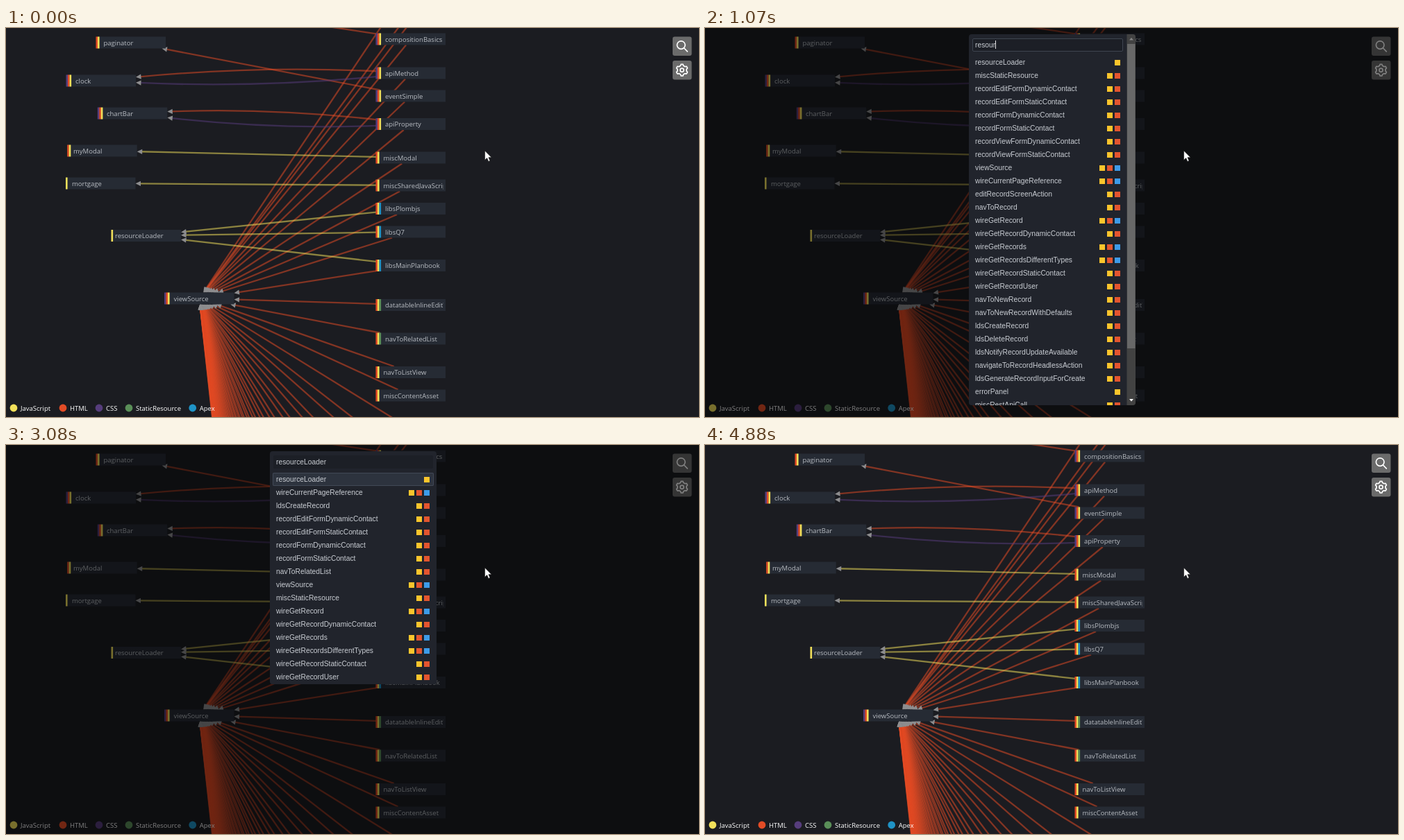
Animation of 998x561 px, one loop 5.14 s. Source, as an HTML page:

```html
<!DOCTYPE html>
<html lang="en">
<head>
<meta charset="utf-8">
<title>Component graph search</title>
<style>
html, body { margin: 0; width: 100%; height: 100%; overflow: hidden; background: #1b1c21; }
#stage { position: relative; width: 998px; height: 561px; overflow: hidden; background: #1b1c21; }
#stage > * { position: absolute; }
svg { display: block; }
#graph, #cursor, #shade { left: 0; top: 0; width: 998px; height: 561px; }
#graph text { font: 9.5px "Open Sans", sans-serif; }
.edge { opacity: .52; }
.edge path { fill: none; stroke-width: 2.3; }
.tip { fill: #8d8d8f; }
.node rect.box { fill: #262b34; }
.node text { fill: #b9bdc3; }
.focus .edge { opacity: .25; }
.focus .tip { fill: #4c4d51; }
.focus .edge.hot { opacity: 1; }
.focus .tip.hot { fill: #fff; }
.focus .node:not(.hot) .box { opacity: .8; }
.focus .node:not(.hot) .mark, .focus .node:not(.hot) text { opacity: .3; }
.focus .pick .box { stroke: #fff; stroke-width: 1.7; }
#shade { background: rgba(0, 0, 0, .5); }
#panel { left: 380px; top: 9px; width: 240px; overflow: hidden; border-radius: 4px; background: #21242c;
  font: 10.3px "Liberation Sans", Arial, sans-serif; color: #c9cdd3; }
#query { position: absolute; left: 5px; top: 6px; right: 5px; height: 19px; box-sizing: border-box;
  border: 1px solid #3e4550; border-radius: 2px; background: #1c1f26; padding-left: 3px; line-height: 18px; white-space: pre; }
#caret { display: inline-block; width: 1px; height: 12px; vertical-align: -2px; background: #e8e8e8; }
#rows { position: absolute; left: 4px; right: 4px; top: 31px; }
.row { display: flex; align-items: center; gap: 3.2px; height: 19px; padding: 0 6px 0 5px; box-sizing: border-box; white-space: nowrap; }
.row span { flex: 1; }
.row i, #side i { width: 8px; height: 8px; flex: none; }
.scroll #query { right: 18px; }
.scroll #rows { right: 16px; }
#bars { position: absolute; left: 0; top: 0; }
#side { left: 0; top: 0; width: 239px; height: 561px; background: #1b1f27; color: #d0d3d8;
  font: 10.3px/19px "Liberation Sans", Arial, sans-serif; }
#side > * { position: absolute; }
#side .bar { left: 0; width: 239px; height: 19px; padding-left: 13px; box-sizing: border-box; background: #252a33;
  font: 8.45px/19px "Open Sans", sans-serif; }
#side .title { top: 19px; height: 23px; padding-left: 4px; background: #2f3640; color: #f2f3f4; font: 600 11px/23px "Open Sans", sans-serif; }
#side .file { left: 23px; }
</style>
</head>
<body>
<div id="stage">
  <svg id="graph" viewBox="0 0 998 561"></svg>
  <div id="shade"></div>
  <div id="panel">
    <div id="query"><span id="typed"></span><span id="caret"></span></div>
    <div id="rows"></div>
    <svg id="bars" width="240" height="535"></svg>
  </div>
  <div id="side"></div>
  <svg id="cursor" viewBox="0 0 998 561">
    <path d="M689.6 177v13.4l3.1-2.8 2.1 4.9 2.3-1-2.1-4.8h4.2z" fill="#fff" stroke="#111" stroke-width=".6"/>
  </svg>
</div>
<script>
const $ = id => document.getElementById(id);
const LOOP = 5140;
const color = { j: '#f1e05a', h: '#e34c26', c: '#563d7c', s: '#5a8f58', a: '#1f93c6' };
const iconColor = { j: '#fcc52c', h: '#e4552f', c: '#3d9be9' };

// ---- graph ----
const W = 50, H = 8.5;
const node = (x, y, marks, label, tx) => ({ x, y, marks, label, tx });
const right = (y, marks, label) => node(583, y, marks, label, marks.length > 2 ? 546 : 543.5);

const view = node(278.5, 390, 'chj', 'viewSource', 241.5);
const loader = node(202, 299.5, 'j', 'resourceLoader', 157);
const [pager, clock, chart, modal, mortgage] = [
  node(180, 21, 'hj', 'paginator', 140.5), node(137, 76, 'chj', 'clock', 100),
  node(182.3, 123, 'chj', 'chartBar', 145), node(138.7, 177, 'hj', 'myModal', 97),
  node(136.5, 224, 'j', 'mortgage', 95)];
const column = [
  right(16, 'chj', 'compositionBasics'), right(65, 'chj', 'apiMethod'), right(98, 'chj', 'eventSimple'),
  right(138.5, 'chj', 'apiProperty'), right(187, 'hj', 'miscModal'), right(227, 'hj', 'miscSharedJavaScript'),
  right(260.5, 'hja', 'libsPlombjs'), right(294, 'hja', 'libsQ7'), right(342.5, 'hja', 'libsMainPlanbook'),
  right(399.5, 'hjs', 'datatableInlineEditWithApex'), right(448, 'hjs', 'navToRelatedList'),
  right(496.5, 'hj', 'navToListView'), right(530, 'hj', 'miscContentAsset')];
const libs = column.slice(6, 9);

// Quadratic curve between node centres, trimmed to the part outside both boxes.
let lines = '', tips = '';
function link(from, to, kind, bend = 0, hot = '') {
  const dx = to.x - from.x, dy = to.y - from.y;
  const c = { x: (from.x + to.x) / 2, y: (from.y + to.y) / 2 + bend };
  const trim = Math.min(W / Math.abs(dx), H / Math.abs(bend ? 0 : dy));
  const blend = (s, t, k) => (1 - s) * (1 - t) * from[k] + (s + t - 2 * s * t) * c[k] + s * t * to[k];
  const at = (s, t) => ({ x: blend(s, t, 'x'), y: blend(s, t, 'y') });
  const a = at(trim, trim), b = at(1 - trim, 1 - trim), m = at(trim, 1 - trim);
  const len = Math.hypot(m.x - b.x, m.y - b.y);
  const ux = (m.x - b.x) / len, uy = (m.y - b.y) / len;
  const corner = s => `${b.x + ux * 7.5 - uy * 3.6 * s} ${b.y + uy * 7.5 + ux * 3.6 * s}`;
  lines += `<g class="edge ${hot}"><path d="M${a.x} ${a.y}Q${m.x} ${m.y} ${b.x + ux * 5} ${b.y + uy * 5}" stroke="${color[kind]}"/></g>`;
  tips += `<path class="tip ${hot}" d="M${b.x} ${b.y}L${corner(1)}L${corner(-1)}z"/>`;
}

const offstage = y => node(583, y);
[-66, -25, -9].forEach(y => link(offstage(y), view, 'h'));
column.forEach(n => link(n, view, 'h'));
for (let i = 0; i < 65; i++) link(offstage(578.5 + 82 * (i >> 1) + 48.5 * (i & 1)), view, 'h');
link(column[0], node(180, -45), 'h');
link(column[2], pager, 'h');
[[1, clock], [3, chart]].forEach(([i, n]) => {
  link(column[i], n, 'h', -20);
  link(column[i], n, 'c', 20);
});
link(column[4], modal, 'j');
link(column[5], mortgage, 'j');
libs.forEach(n => link(n, loader, 'j', 0, 'hot'));

function drawNode(n) {
  const x = n.x - W, y = n.y - H;
  const hot = n === loader ? 'hot pick' : libs.includes(n) ? 'hot' : '';
  const marks = [...n.marks].map((m, i) =>
    `<rect class="mark" x="${x - .5 + i * 2.5}" y="${y}" width="2.6" height="17" fill="${color[m]}"/>`).join('');
  return `<g class="node ${hot}"><rect class="box" x="${x}" y="${y}" width="100" height="17"/>${marks}
    <svg x="${n.tx}" y="${y}" width="${x + 96.5 - n.tx}" height="17" overflow="hidden"><text y="12.1">${n.label}</text></svg></g>`;
}

const legend = [[11, 'j', 'JavaScript'], [82, 'h', 'HTML'], [134, 'c', 'CSS'], [177, 's', 'StaticResource'], [268.7, 'a', 'Apex']]
  .map(([x, k, s]) => `<circle cx="${x}" cy="548" r="5.4" fill="${color[k]}"/><text x="${x + 10}" y="552" fill="#fff">${s}</text>`).join('');

const gear = Array.from({ length: 36 }, (_, i) => {
  const r = i % 6 < 3 ? 8.4 : 6.5, a = (i - 1) * Math.PI / 18 - Math.PI / 2;
  return `${973.5 + r * Math.cos(a)},${60.7 + r * Math.sin(a)}`;
}).join(' ');
const buttons = `<g fill="#6b6b6b"><rect x="960" y="12.5" width="27.5" height="27.5" rx="3"/><rect x="960" y="47" width="27.5" height="27.5" rx="3"/></g>
  <g fill="none" stroke="#fff" stroke-width="1.7" stroke-linejoin="round" stroke-linecap="round">
  <circle cx="972.2" cy="24.6" r="5.8"/><path d="M976.5 29l4.8 4.8"/>
  <polygon points="${gear}"/><circle cx="973.5" cy="60.7" r="2.6"/></g>`;

$('graph').innerHTML = lines + tips +
  [pager, clock, chart, modal, mortgage, loader, view, ...column].map(drawNode).join('') + legend + buttons;

// ---- side panel ----
const bar = (top, text, arrow) => `<div class="bar" style="top:${top}px">${text}</div>
  <svg style="left:2px;top:${top + 6}px" width="8" height="7" fill="none" stroke="#d8dadd"><path d="${arrow}"/></svg>`;
const square = (x, y, size) => `<i style="left:${x}px;top:${y}px;width:${size}px;height:${size}px;background:${iconColor.j}"></i>`;
$('side').innerHTML =
  `<svg style="left:226px;top:5px" width="7" height="7" stroke="#e4e4e4"><path d="M.8.8l5.4 5.4M6.2.8L.8 6.2"/></svg>
  <div class="bar title">resourceLoader</div>${square(222, 25.5, 10)}` +
  bar(43, 'REFERENCED BY', 'M0 3.5h7M4 .5l3 3-3 3') + bar(119, 'REFERENCES', 'M7 3.5H.5M3.5.5l-3 3 3 3') +
  libs.map((n, i) => square(10, 68 + i * 18.7, 8) + `<div class="file" style="top:${62 + i * 18.7}px">${n.label}.js</div>`).join('');

// ---- search panel ----
const split = s => s.trim().split(/\s+/);
const forms = split('recordEditFormDynamicContact recordEditFormStaticContact recordFormDynamicContact recordFormStaticContact');
const views = split('recordViewFormDynamicContact recordViewFormStaticContact');
const wires = split('wireGetRecord wireGetRecordDynamicContact wireGetRecords wireGetRecordsDifferentTypes wireGetRecordStaticContact wireGetRecordUser');
const page = 'wireCurrentPageReference';
const short = [...forms, ...views, ...split('resourceLoader errorPanel mortgage'), page,
  ...split('wireGetObjectInfo wireGetPicklistValues wireGetPicklistValuesByRecordType'), ...wires,
  ...split('wireListView chartBar apiProperty editRecordScreenAction ldsCreateRecord miscRestApiCall navToRecord')];
const tail = split('navToNewRecord navToNewRecordWithDefaults ldsCreateRecord ldsDeleteRecord ldsNotifyRecordUpdateAvailable navigateToRecordHeadlessAction ldsGenerateRecordInputForCreate errorPanel miscRestApiCall');
const mid = [...split('resourceLoader miscStaticResource'), ...forms, ...views, 'viewSource', page,
  ...split('editRecordScreenAction navToRecord'), ...wires, ...tail];
const long = [...split('resourceLoader miscStaticResource viewSource'), ...forms, page, ...wires,
  ...split('ldsCreateRecord navigateToRecordHeadlessAction editRecordScreenAction'), ...views,
  ...split('navToRecord navToNewRecord navToNewRecordWithDefaults ldsDeleteRecord ldsNotifyRecordUpdateAvailable ldsGenerateRecordInputForCreate')];
const full = ['resourceLoader', page, 'ldsCreateRecord', ...forms, ...split('navToRelatedList viewSource miscStaticResource'), ...wires];

const onlyScript = split('resourceLoader errorPanel mortgage');
const styled = [page, ...split('wireGetObjectInfo wireGetPicklistValues wireGetPicklistValuesByRecordType wireGetRecord wireGetRecords wireGetRecordsDifferentTypes chartBar apiProperty viewSource')];
const kinds = name => onlyScript.includes(name) ? 'j' : styled.includes(name) ? 'jhc' : 'jh';
const row = name => `<div class="row"><span>${name}</span>` +
  [...kinds(name)].map(k => `<i style="background:${iconColor[k]}"></i>`).join('') + '</div>';

const longRows = { 8: 25, 9: 20, 10: 19, 11: 19, 12: 20 };
function results(n) {
  if (!n) return [];
  if (n < 3) return short;
  if (n < 8) return mid;
  return n < 13 ? long.slice(0, longRows[n]) : full;
}

function scrollbars(n) {
  const wide = n < 3, end = wide ? 522 : 535;
  const tri = (d, fill) => `<path d="${d}" fill="${fill}"/>`;
  let s = `<rect x="227.5" width="12.5" height="${end}" fill="#424242"/>
    <rect x="228" y="14" width="11.5" height="${wide ? 198 : 439}" fill="#686868"/>` +
    tri('M231 8.5h6l-3-3.5z', '#858585') + tri(`M231 ${end - 9}h6l-3 3.5z`, '#fff');
  if (wide) s += `<rect y="522" width="227.5" height="13" fill="#424242"/><rect x="227.5" y="522" width="13" height="13" fill="#17181b"/>
    <rect x="13" y="523" width="197" height="11" fill="#686868"/>` +
    tri('M8.5 525.5v6l-3.5-3z', '#858585') + tri('M219 525.5v6l3.5-3z', '#fff');
  return s;
}

function drawPanel(n, pick) {
  const list = results(n), scroll = n > 0 && n < 8;
  $('panel').className = scroll ? 'scroll' : '';
  $('panel').style.height = (scroll ? 535 : 32 + 19 * list.length - (n ? 0 : 1)) + 'px';
  $('typed').textContent = 'resourceLoader'.slice(0, n);
  $('caret').style.display = pick ? 'none' : '';
  $('query').style.borderColor = ['#3e4550', '#2d323b', '#1c1f26'][pick];
  $('rows').innerHTML = list.map(row).join('');
  $('bars').innerHTML = scroll ? scrollbars(n) : '';
  if (pick) {
    const st = $('rows').firstChild.style;
    st.background = pick > 1 ? '#2d333e' : '#272b35';
    st.boxShadow = `inset 0 0 0 1px ${pick > 1 ? '#414956' : '#313742'}`;
    st.borderRadius = '2px';
  }
}

// ---- timeline ----
const typing = [70, 540, 600, 800, 890, 980, 1070, 1340, 1410, 1670, 1940, 2010, 2140, 2420, 2490];
const steps = [
  { at: 0 },
  ...typing.map((at, n) => ({ at, n, pick: 0 })),
  { at: 3020, n: 14, pick: 1 }, { at: 3080, n: 14, pick: 2 },
  { at: 3550, side: .5, focus: true }, { at: 3620, side: 1, focus: true },
  { at: 4750, side: .75 }, { at: 4810, side: .3 }, { at: 4880 }];

function apply({ n, pick, side = 0, focus = false }) {
  const open = n !== undefined;
  $('shade').style.display = $('panel').style.display = open ? '' : 'none';
  if (open) drawPanel(n, pick);
  $('side').style.transform = `translateX(${(side - 1) * 100}%)`;
  $('graph').setAttribute('class', focus ? 'focus' : '');
}

let shown;
const start = performance.now();
function tick() {
  const t = (performance.now() - start) % LOOP;
  const step = steps.findLast(s => s.at <= t);
  if (step !== shown) apply(shown = step);
  requestAnimationFrame(tick);
}
tick();
</script>
</body>
</html>
```
